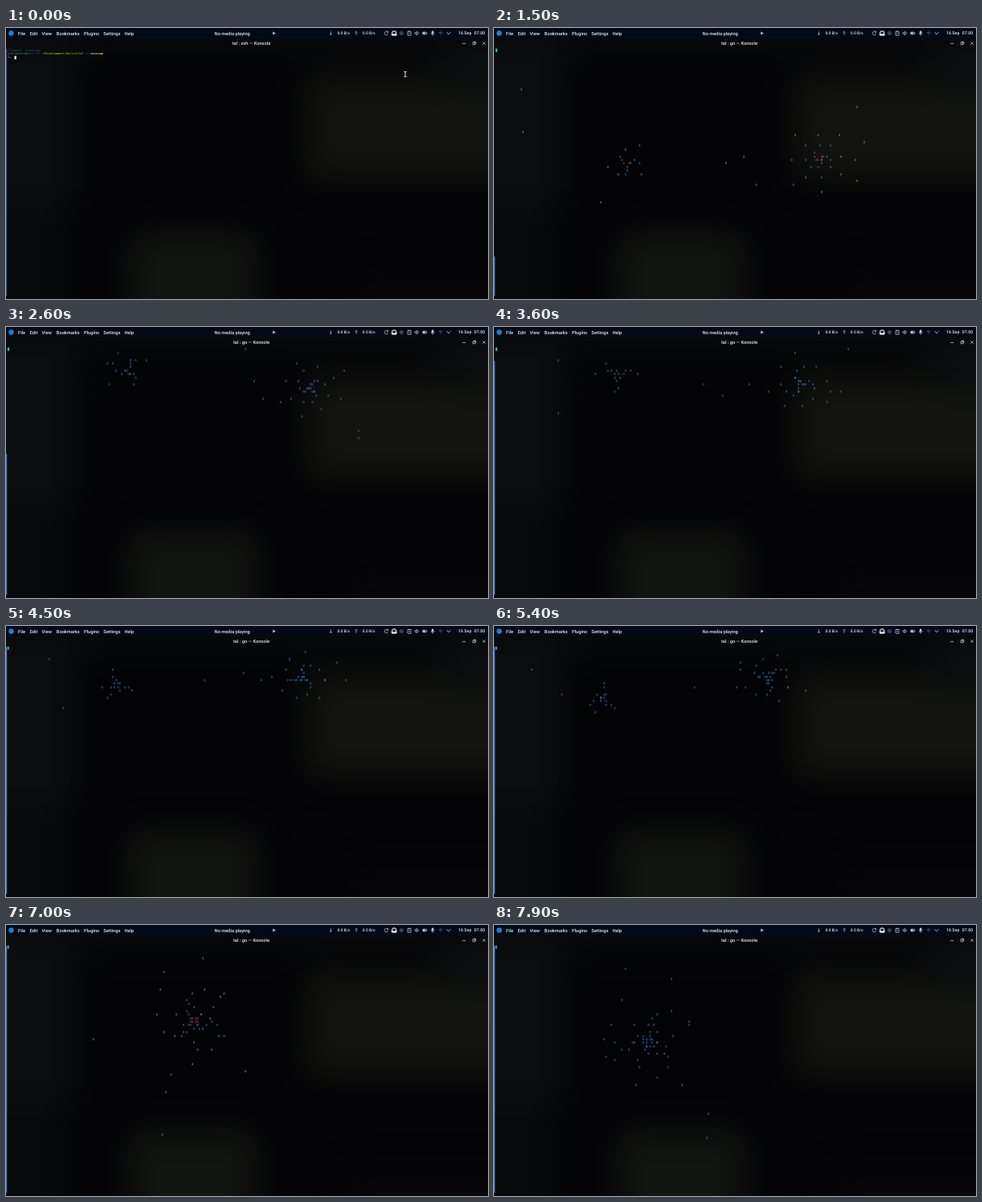
An HTML page that plays this animation: 600x338 px, repeating every 8000 ms.

```html
<!DOCTYPE html>
<html lang="en">
<head>
<meta charset="utf-8">
<title>Terminal galaxies</title>
<style>
  html, body { margin: 0; width: 100%; height: 100%; overflow: hidden; background: #040406; }
  svg { display: block; width: 100vw; height: 100vh; }
  text { white-space: pre; text-rendering: geometricPrecision; }
  .ui { font-family: Roboto, "Open Sans", sans-serif; font-weight: 500; font-size: 5.7px; fill: #e3e6ea; }
  .small { font-size: 4.9px; }
  .clock { font-size: 5.3px; }
  .mono { font-family: "DejaVu Sans Mono", "Noto Sans Mono", monospace; font-size: 3.66px; }
  #sky { font-size: 4.1px; }
  .line { fill: none; stroke: #d5d9df; stroke-width: .7; }
</style>
</head>
<body>
<svg viewBox="0 0 600 338" preserveAspectRatio="none">
  <defs>
    <filter id="blur" x="-20%" y="-20%" width="140%" height="140%" color-interpolation-filters="sRGB">
      <feGaussianBlur stdDeviation="20"/>
    </filter>
    <clipPath id="screen"><rect y="25" width="600" height="313"/></clipPath>
  </defs>

  <rect width="600" height="338" fill="#040406"/>
  <g filter="url(#blur)">
    <rect x="-60" y="-60" width="720" height="95" fill="#08090b"/>
    <rect x="-60" y="20" width="150" height="200" fill="#0a0c0d"/>
    <rect x="-60" y="220" width="140" height="180" fill="#08090b"/>
    <rect x="375" y="62" width="290" height="125" fill="#13140f"/>
    <rect x="545" y="20" width="120" height="60" fill="#0a0d0e"/>
    <rect x="155" y="258" width="155" height="130" fill="#131511"/>
    <rect x="430" y="305" width="220" height="90" fill="#08080a"/>
  </g>
  <rect width="600" height="13" fill="#030a17"/>

  <circle cx="6.5" cy="6.5" r="3.2" fill="#1684d6"/>
  <g id="panel" class="ui"></g>
  <path d="M332 4.6l4.2 1.9-4.2 1.9z" fill="#a9aeb6"/>
  <g class="line">
    <path d="M404.3 4.4v4.2m-1.2-1.2l1.2 1.2 1.2-1.2M436 8.6V4.4m-1.2 1.2l1.2-1.2 1.2 1.2"/>
    <path d="M475.2 5.2a2.3 2.3 0 1 0 .3 2M475.6 3.8v1.6h-1.6"/>
    <path d="M480.3 6.6l1-2.6h3.6l1 2.6v2.4h-5.6z" fill="#20242c" stroke="#fff" stroke-width="1"/>
    <path d="M480.4 7.2h1.7l.5 1h1l.5-1h1.7v1.9h-5.4z" fill="#fff"/>
    <g opacity=".55">
      <circle cx="492.3" cy="6.5" r="2"/><circle cx="492.3" cy="6.5" r=".7"/>
      <path d="M538.8 5.8q2.2-1.8 4.4 0M539.7 7.1q1.3-1 2.6 0M541 8.1v.6"/>
    </g>
    <path d="M500 4.4h4v4.8h-4zM501.2 4.2h1.6M501.2 6.7h1.6"/>
    <path d="M509 5.7h1.1l1.5-1.4v4.4l-1.5-1.4H509zM512.7 5q1.3 1.5 0 3"/>
    <path d="M518.8 5.2h4.4v2.7h-4.4zM524 6v1.2"/><path d="M519 6.5h2.8" stroke-width="2"/>
    <rect x="530.2" y="3.8" width="1.8" height="3.2" rx=".9" fill="#d5d9df"/>
    <path d="M529.2 6.2q0 1.9 1.9 1.9t1.9-1.9M531.1 8v1.4"/>
    <path d="M548.6 5.3l2.4 2.4 2.4-2.4" stroke-width=".9"/>
    <path d="M568.2 19.4h3.8M581.1 18h2.8v2.8h-2.8zM582 18v-.9h2.8v2.8h-.9M593.4 17.4l3.4 3.4m0-3.4l-3.4 3.4"/>
  </g>
  <text id="title" class="ui" x="305.5" y="21" text-anchor="middle"></text>

  <g id="shell" class="mono">
    <text x="2" y="28.8" fill="#27639c">^Csignal: interrupt</text>
    <text x="2" y="33.2" fill="#d4d4d4">┌─<tspan fill="#2c9c3c">plumfern@</tspan><tspan fill="#1d6250">desk-10</tspan><tspan fill="#c9cf2c"> ~/Development/Go/src/tal</tspan><tspan fill="#24507c"> on </tspan><tspan fill="#f2f2f2">main</tspan><tspan fill="#d05a22">●</tspan><tspan fill="#c8961e">●●</tspan></text>
    <text x="2" y="37.6" fill="#d4d4d4">└─</text>
    <text id="typed" x="10.5" y="37.8" fill="#58c070"></text>
    <rect id="caret" y="34.8" width="2.3" height="4.3" fill="#e8e8e8"/>
  </g>
  <path id="pointer" class="line" d="M495.2 54.2q1.8 0 1.8 1 0-1 1.8-1M497 55v5M495.2 60.9q1.8 0 1.8-1 0 1 1.8 1" style="stroke:#fff;stroke-width:.9"/>

  <rect id="scroll" x="0"/>
  <g id="sky" class="mono" text-anchor="middle" clip-path="url(#screen)"></g>
  <rect id="home" y="25.6" width="2.2" height="4.3"/>
</svg>

<script>
const LOOP = 8000, STEP = 100, LAUNCH = 1100;
const CELL = { x: 3.1, y: 27.8, w: 2.2, h: 4.41 };
const GOLDEN = 2.39996;
const BLUE = '#3b76c4', STEEL = '#4a719c', GREY = '#7d8794', RED = '#b04a4a';

const $ = id => document.getElementById(id);
const show = (el, on) => el.setAttribute('visibility', on ? 'inherit' : 'hidden');
const set = (el, attrs) => { for (const k in attrs) el.setAttribute(k, attrs[k]); };
const addText = (parent, text, attrs) => {
  const el = document.createElementNS('http://www.w3.org/2000/svg', 'text');
  el.textContent = text;
  set(el, attrs);
  return parent.appendChild(el);
};

// Pose times shared by every track.
const TIMES = [1500, 2600, 3600, 5400, 7000, 7900];
const SPREAD = [1, .9, .9, .75, 1.2, 1.3];
const HEAT = [1, 0, .1, 0, 1, 0];

const galaxies = [
  { n: 15, reach: 27, x: [166, 153, 154, 135, 235, 192], y: [170, 54, 61, 90, 122, 146] },
  { n: 29, reach: 46, x: [406, 379, 382, 341, 234, 193], y: [163, 77, 71, 65, 119, 145] }
];
const drifters = [
  { x: [33, 139, 79, 47, 108, 150], y: [76, 32, 41, 54, 142, 168] },
  { x: [36, 126, 79, 84, 196, 139], y: [129, 45, 107, 85, 58, 164] },
  { x: [132, 128, 126, 126, 205, 137], y: [217, 72, 58, 107, 186, 142] },
  { x: [290, 310, 260, 249, 299, 242], y: [168, 67, 72, 76, 182, 120] },
  { x: [312, 299, 317, 302, 194, 266], y: [160, 27, 72, 76, 261, 265] },
  { x: [327, 321, 284, 306, 271, 268], y: [195, 89, 85, 45, 138, 234] },
  { x: [453, 438, 442, 367, 245, 163], y: [98, 129, 27, 76, 41, 54] },
  { x: [453, 438, 433, 389, 198, 235], y: [190, 137, 81, 81, 208, 199] },
  { x: [460, 422, 420, 363, 267, 220], y: [142, 54, 81, 54, 89, 67] }
];

const slope = (v, i) => {
  const a = Math.max(i - 1, 0), b = Math.min(i + 1, v.length - 1);
  return (v[b] - v[a]) / (TIMES[b] - TIMES[a]);
};

// Cubic Hermite through the poses, straight beyond both ends.
function track(v, t) {
  const last = TIMES.length - 1;
  if (t <= TIMES[0]) return v[0] + slope(v, 0) * (t - TIMES[0]);
  if (t >= TIMES[last]) return v[last] + slope(v, last) * (t - TIMES[last]);
  const i = TIMES.findIndex(k => k > t) - 1;
  const span = TIMES[i + 1] - TIMES[i], u = (t - TIMES[i]) / span, w = 1 - u;
  return w * w * (1 + 2 * u) * v[i] + u * u * (3 - 2 * u) * v[i + 1]
    + span * u * w * (w * slope(v, i) - u * slope(v, i + 1));
}

const menu = { File: 15, Edit: 29.7, View: 44.5, Bookmarks: 62.8, Plugins: 97, Settings: 121.3, Help: 147.4,
  'No media playing': 259.6 };
for (const label in menu) addText($('panel'), label, { x: menu[label], y: 8.5 });
for (const x of [412.4, 443.8]) addText($('panel'), '0.0 B/s', { x, y: 8.3, class: 'small' });
addText($('panel'), '16 Sep', { x: 563, y: 8.4, class: 'clock' });
addText($('panel'), '07.00', { x: 582.8, y: 8.4, class: 'clock' });

const glyph = () => addText($('sky'), '0', {});
for (const g of galaxies) {
  g.bodies = Array.from({ length: g.n }, (_, i) => {
    const rank = i / g.n, r = 3 + g.reach * rank ** 1.6;
    return { el: glyph(), rank, r, phase: i * GOLDEN + g.n, spin: 14 / (r + 4) };
  });
}
for (const d of drifters) d.el = glyph();

function place(el, x, y, fill) {
  const col = Math.round((x - CELL.x) / CELL.w), row = Math.round((y - CELL.y) / CELL.h);
  set(el, { x: CELL.x + col * CELL.w, y: CELL.y + row * CELL.h + 1.5, fill });
  show(el, row >= 0);
}

function drawSky(t) {
  const spread = track(SPREAD, t), heat = track(HEAT, t), outer = heat > .5 ? GREY : STEEL;
  for (const g of galaxies) {
    const cx = track(g.x, t), cy = track(g.y, t);
    for (const b of g.bodies) {
      const a = b.phase + b.spin * t / 1000, r = b.r * spread;
      const fill = b.rank < .2 * heat - .05 ? RED : b.rank < .65 ? BLUE : outer;
      place(b.el, cx + r * Math.cos(a), cy + r * Math.sin(a), fill);
    }
  }
  for (const d of drifters) place(d.el, track(d.x, t), track(d.y, t), outer);
}

function render(time) {
  const t = Math.floor(time / STEP) * STEP, running = t >= LAUNCH;
  $('title').textContent = `tal : ${running ? 'go' : 'zsh'} — Konsole`;
  show($('shell'), !running);
  show($('pointer'), t < 800);
  show($('sky'), running);
  show($('home'), running);

  const typed = t < 800 ? '' : t < 900 ? 'go' : 'go run .';
  $('typed').textContent = typed;
  set($('caret'), { x: 10.5 + typed.length * CELL.w });

  const top = running ? Math.max(26, 285 - (t - 1500) * .1153) : 26;
  set($('scroll'), { y: top, height: 334 - top, width: 1.2, fill: running ? '#3d7cf0' : '#2a529c' });
  set($('home'), { x: t < 3800 ? 1.9 : 1.6, fill: t < 3800 ? '#3fb5a6' : '#3a8fbd' });
  if (running) drawSky(t);
}

function tick() {
  render(performance.now() % LOOP);
  requestAnimationFrame(tick);
}
tick();
</script>
</body>
</html>
```
